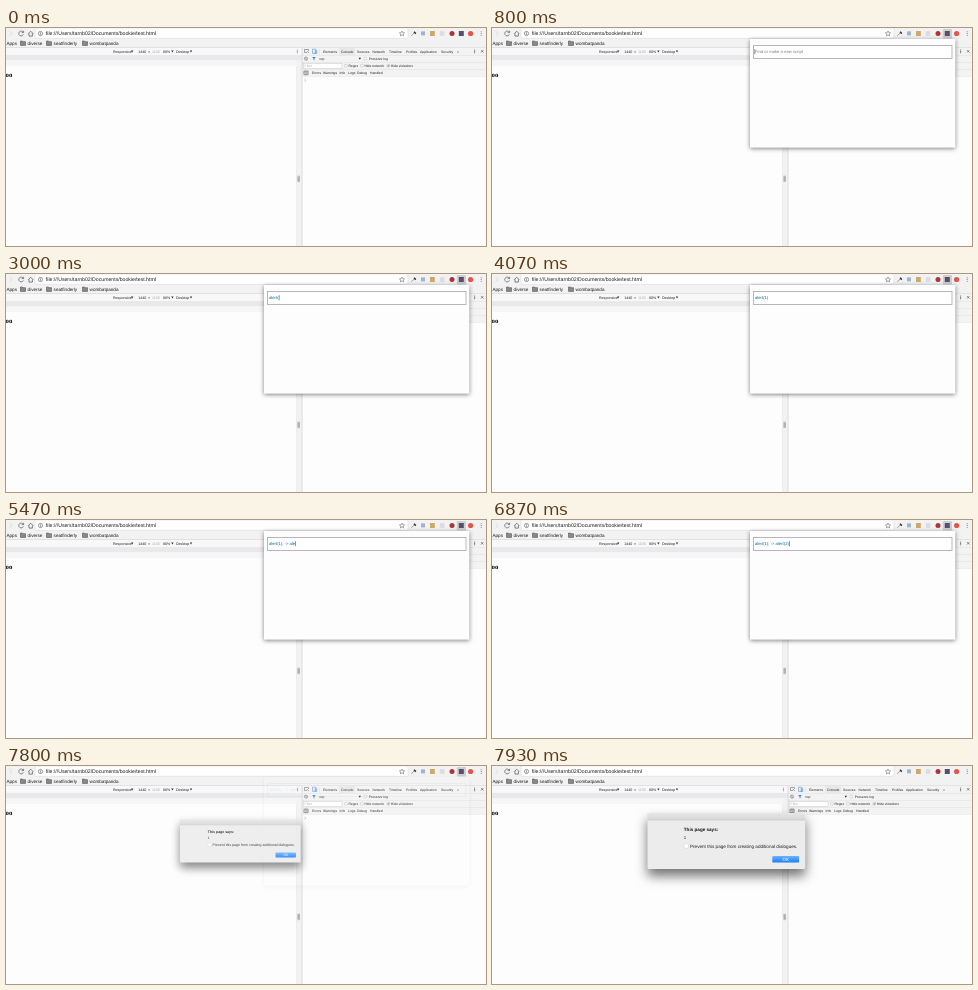
Write an HTML page that moves like this. It is 480 px wide and 218 px high and loops after 8000 ms.

```html
<!DOCTYPE html>
<html lang="en">
<head>
<meta charset="utf-8">
<title>Script popup</title>
<style>
  html, body { margin: 0; width: 100%; height: 100%; overflow: hidden; background: #fdfdfd; }
  svg { display: block; width: 480px; height: 218px; }
  text { font-family: "Liberation Sans", Arial, sans-serif; white-space: pre; text-rendering: geometricPrecision; }
  .serif { font-family: "Liberation Serif", Times, serif; }
  .popup { filter: drop-shadow(0 1px 2px rgba(0, 0, 0, .5)); }
  .dialog { filter: drop-shadow(0 7px 6px rgba(0, 0, 0, .55)); }
</style>
</head>
<body>
<svg id="stage" viewBox="0 0 480 218">
  <defs>
    <linearGradient id="bar" x2="0" y2="1">
      <stop stop-color="#e6e6e6"/><stop offset="1" stop-color="#d6d6d6"/>
    </linearGradient>
    <linearGradient id="blue" x2="0" y2="1">
      <stop stop-color="#6cb4fa"/><stop offset="1" stop-color="#1a7df8"/>
    </linearGradient>
  </defs>
</svg>
<script>
const stage = document.getElementById('stage');

function add(parent, tag, attrs) {
  const node = document.createElementNS('http://www.w3.org/2000/svg', tag);
  for (const key in attrs) node.setAttribute(key, attrs[key]);
  return parent.appendChild(node);
}
const group = (attrs = {}) => add(stage, 'g', attrs);
const rect = (g, x, y, width, height, fill, more) =>
  add(g, 'rect', { x, y, width, height, fill, ...more });
const disc = (g, cx, cy, r, fill, more) => add(g, 'circle', { cx, cy, r, fill, ...more });
const path = (g, d, stroke, width = 0.6, fill = 'none') =>
  add(g, 'path', { d, stroke, 'stroke-width': width, fill });
function label(g, x, y, size, fill, content, more) {
  const node = add(g, 'text', { x, y, 'font-size': size, fill, ...more });
  node.textContent = content;
  return node;
}
const arrow = (g, x, y) => path(g, `M${x} ${y}h2.4l-1.2 2z`, 'none', 0, '#333');
const dots = (g, x, y, step, fill) => {
  for (const i of [-1, 0, 1]) disc(g, x, y + i * step, 0.5, fill);
};
const checkbox = (g, x, y, on) => {
  rect(g, x, y, 2.6, 2.6, '#fff', { stroke: '#aaa', 'stroke-width': 0.4, rx: 0.4 });
  if (on) path(g, `M${x + 0.5} ${y + 1.3}l.7.8 1-1.7`, '#222', 0.5);
};

// Browser toolbar and bookmarks
const chrome = group();
rect(chrome, 0, 0, 480, 20, '#f2f2f2');
rect(chrome, 29, 0, 373, 10.3, '#fff', { stroke: '#d4d4d4', 'stroke-width': 0.5, rx: 1 });
path(chrome, 'M3.5 3l2.7 2.5-2.7 2.5', '#d8d8d8', 0.8);
path(chrome, 'M17.2 4.2a2.4 2.4 0 1 0 .2 2.2M17.6 2.8v1.8h-1.9', '#555', 0.7);
path(chrome, 'M22.2 5.7l2.5-2.5 2.5 2.5M23 5.3v2.8h3.4V5.3', '#555', 0.7);
disc(chrome, 34.5, 5.5, 2.1, 'none', { stroke: '#555', 'stroke-width': 0.6 });
path(chrome, 'M34.5 5.2v1.5M34.5 4.1v.6', '#444', 0.6);
label(chrome, 39.8, 7.3, 5.18, '#1c1c1c', 'file:///Users/tarnb02/Documents/bookie/test.html');
path(chrome, 'M396 3l.8 1.7 1.8.2-1.4 1.2.4 1.8-1.6-1-1.6 1 .4-1.8-1.4-1.2 1.8-.2z', '#555', 0.5);
path(chrome, 'M405.4 7.8l3-3', '#888', 0.8);
path(chrome, 'M408 3.8l1.8 1.8', '#333', 1.5);
rect(chrome, 415, 3.4, 4, 4, '#9fb6ca');
rect(chrome, 424, 3, 4.8, 5, '#cfa868');
rect(chrome, 433.8, 3.2, 4.6, 4.6, '#dcdcdc');
disc(chrome, 446, 5.5, 2.5, '#b0323a');
const pressed = rect(chrome, 450.8, 1, 9.2, 9.4, '#cfcfd2', { rx: 1 });
rect(chrome, 452.8, 3, 5, 5, '#56506b');
disc(chrome, 464.6, 5.5, 2.6, '#e2574a');
dots(chrome, 475.2, 5.5, 1.8, '#666');

label(chrome, 0.5, 16.8, 4.6, '#1c1c1c', 'Apps');
[[14, 'diverse'], [40, 'seatfinderly'], [76, 'wombatpanda']].forEach(([x, name]) => {
  path(chrome, `M${x + 0.5} 13h2l.6.7h2.4v3.7h-5z`, '#555', 0.6, '#8a8a8a');
  label(chrome, x + 7.6, 16.8, 4.6, '#1c1c1c', name);
});

// Device bar, media query bar and page
const page = group();
rect(page, 0, 19.6, 296, 7.6, '#f8f8f8');
rect(page, 0, 19.4, 480, 0.5, '#cdcdcd');
rect(page, 0, 27, 296, 5.5, '#e9e9eb');
rect(page, 0, 32.5, 290.5, 5.5, '#f6f6f6');
[[107, 'Responsive'], [132.3, '1440'], [142, '×'], [146, '1100', '#aaa'],
 [157, '80%'], [170, 'Desktop']].forEach(([x, name, fill = '#1c1c1c']) =>
  label(page, x, 24.6, 3.6, fill, name));
[125, 165.2, 183.8].forEach(x => arrow(page, x, 22.5));
dots(page, 291.3, 23.4, 1.3, '#777');
label(page, 6.4, 49, 6.8, '#000', 'foo', { class: 'serif', 'font-weight': 700, 'text-anchor': 'end' });
rect(page, 290.5, 32.5, 5.5, 185.5, '#f2f2f2');
rect(page, 290.3, 38, 0.4, 180, '#dedede');
rect(page, 291.4, 147.6, 2.6, 6.6, '#c6c6c6');
path(page, 'M292.2 148.6v4.6M293.2 148.6v4.6', '#888', 0.4);

// Developer tools
const tools = group();
rect(tools, 296, 19.8, 184, 28.4, '#f3f3f3');
rect(tools, 295.8, 19.8, 0.5, 198.2, '#c4c4c4');
[27, 34, 41, 48].forEach(y => rect(tools, 296, y, 184, 0.4, '#d8d8d8'));
path(tools, 'M301 24.5h-2.5v-3h4v1.5M300.7 22.9l2.2 2.2', '#555', 0.5);
path(tools, 'M306.5 21.2h3.4v4.2h-3.4zM309 22.8h1.8v2.6H309z', '#3b82d8', 0.5);
rect(tools, 313, 21, 0.3, 5, '#ccc');
rect(tools, 333, 20, 16, 7, '#e8e8e8');
[[317, 'Elements'], [335, 'Console'], [351, 'Sources'], [366.5, 'Network'],
 [383, 'Timeline'], [400, 'Profiles'], [414, 'Application'], [435, 'Security'],
 [451, '»']].forEach(([x, name]) => label(tools, x, 24.6, 3.4, '#222', name));
dots(tools, 468.7, 23.4, 1.3, '#444');
path(tools, 'M475 22.1l2.4 2.4M477.4 22.1l-2.4 2.4', '#444', 0.6);

disc(tools, 300, 30.6, 1.6, 'none', { stroke: '#555', 'stroke-width': 0.5 });
path(tools, 'M298.9 29.5l2.2 2.2', '#555', 0.5);
path(tools, 'M306.2 29h3.6l-1.4 1.7v1.8l-.8-.5v-1.3z', 'none', 0, '#3b82d8');
label(tools, 313.6, 31.8, 3.4, '#222', 'top');
arrow(tools, 352.6, 29.7);
checkbox(tools, 358, 29.3);
label(tools, 362.8, 31.8, 3.4, '#222', 'Preserve log');

rect(tools, 297.6, 35.4, 38.4, 5, '#fff', { stroke: '#bbb', 'stroke-width': 0.4 });
label(tools, 298.6, 39, 3.4, '#aaa', 'Filter');
[[338.6, 'Regex'], [354.6, 'Hide network'], [381, 'Hide violations', true]].forEach(([x, name, on]) => {
  checkbox(tools, x, 36.4, on);
  label(tools, x + 3.8, 39, 3.4, '#222', name);
});

rect(tools, 297.4, 42.4, 5.2, 4.8, '#9a9a9a', { rx: 1.2 });
label(tools, 298.1, 46, 3.2, '#fff', 'All');
[[306, 'Errors'], [317, 'Warnings'], [333.6, 'Info'], [342, 'Logs'], [351, 'Debug'],
 [364, 'Handled']].forEach(([x, name]) => label(tools, x, 46, 3.4, '#222', name));
path(tools, 'M298.6 51l1.2 1.2-1.2 1.2', '#5a8fd0', 0.5);

// Script popup
const popup = group({ class: 'popup' });
rect(popup, 258, 11, 205.3, 108.6, '#fdfdfd');
rect(popup, 261.5, 17.5, 198.5, 13, '#fff', { stroke: '#aaa2b2', 'stroke-width': 0.8 });
const hint = label(popup, 263, 25.2, 4.2, '#7c7c7c', 'Find or make a new script');
const code = label(popup, 263, 25.2, 4.2, '#0568a0', '');
const caret = rect(popup, 263, 21.2, 0.5, 5, '#333');

// Alert dialog, final size; scaled about its centre while opening
const dialog = group({ class: 'dialog' });
rect(dialog, 155.5, 47, 157.7, 56, '#ececec', { rx: 1.6 });
path(dialog, 'M155.5 54v-5.4q0-1.6 1.6-1.6h154.5q1.6 0 1.6 1.6V54z', 'none', 0, 'url(#bar)');
rect(dialog, 155.5, 53.8, 157.7, 0.5, '#bdbdbd');
label(dialog, 191.8, 65, 4.6, '#111', 'This page says:', { 'font-weight': 700 });
label(dialog, 191.8, 72.6, 4.4, '#222', '1');
rect(dialog, 192, 77.8, 4.4, 4.4, '#fff', { rx: 0.8, stroke: '#c4c4c4', 'stroke-width': 0.4 });
label(dialog, 198, 81.7, 4.62, '#222', 'Prevent this page from creating additional dialogues.');
rect(dialog, 280.3, 90, 26.8, 6.6, 'url(#blue)', { rx: 1.2 });
label(dialog, 293.7, 95, 4.5, '#fff', 'OK', { 'text-anchor': 'middle' });

// Each track lists [time, value]; a value holds until the next time.
const LOOP = 8000;
const SCRIPT = 'alert(1); -> alert(2)';
const typed = [[0, 0], [2270, 1], [2470, 2], [2600, 3], [2730, 4], [3000, 6], [3270, 7],
  [3530, 8], [4200, 9], [4400, 10], [4670, 11], [4800, 12], [5070, 13], [5200, 14],
  [5270, 15], [5400, 16], [5530, 17], [5670, 18], [5930, 19], [6200, 20], [6600, 21]];
const caretOn = [[0, 1], [1330, 0], [1730, 1], [2200, 0], [2270, 1], [4070, 0], [4200, 1], [7330, 0]];
const popupAlpha = [[0, 0], [330, 1], [7730, 0.5], [7800, 0.1], [7870, 0]];
const iconPressed = [[0, 0], [130, 1], [7930, 0]];
const dialogScale = [[0, 0], [7800, 0.765], [7870, 0.93], [7930, 1]];
const dialogAlpha = [[0, 0], [7800, 0.85], [7870, 0.96], [7930, 1]];

function at(track, t) {
  let value = track[0][1];
  for (const [time, next] of track) if (t >= time) value = next;
  return value;
}

const start = performance.now();
function draw() {
  const t = Math.max(0, performance.now() - start) % LOOP;
  const count = at(typed, t);
  const text = SCRIPT.slice(0, count);
  if (code.textContent !== text) code.textContent = text;
  hint.setAttribute('opacity', count ? 0 : 1);
  caret.setAttribute('x', 263 + (count ? code.getComputedTextLength() + 0.3 : -0.4));
  caret.setAttribute('opacity', at(caretOn, t));
  popup.setAttribute('opacity', at(popupAlpha, t));
  pressed.setAttribute('opacity', at(iconPressed, t));
  dialog.setAttribute('opacity', at(dialogAlpha, t));
  dialog.setAttribute('transform',
    `translate(234.3 75) scale(${at(dialogScale, t)}) translate(-234.3 -75)`);
  requestAnimationFrame(draw);
}
draw();
</script>
</body>
</html>
```
